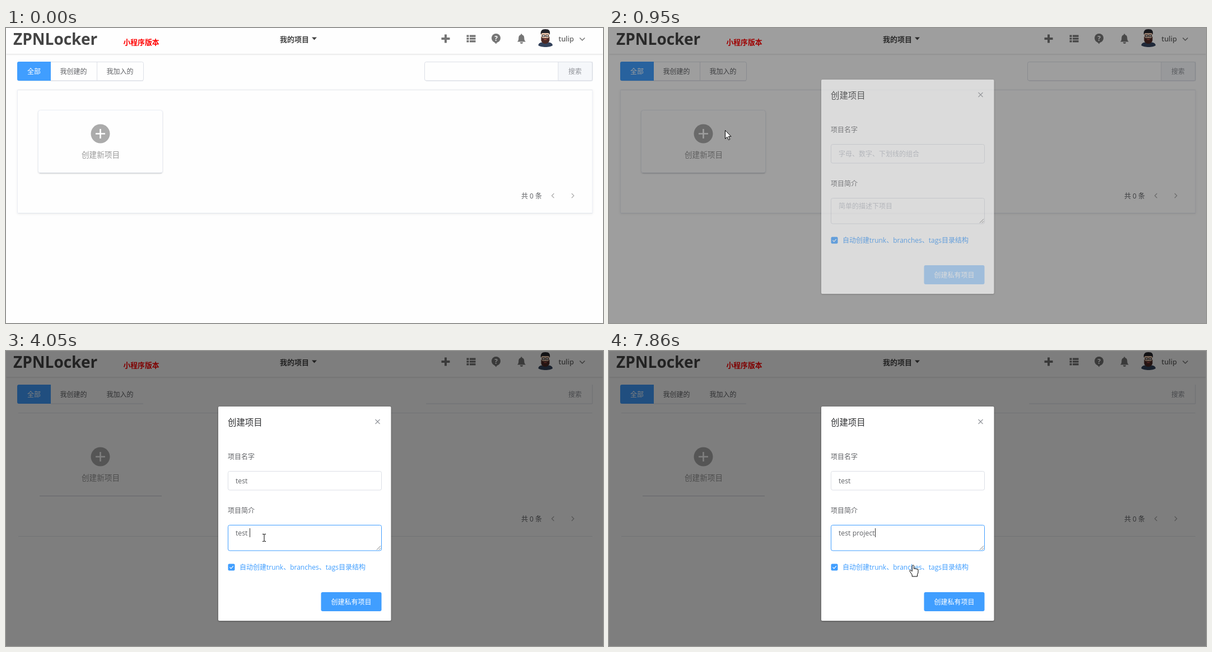
Write an HTML page that moves like this. It is 1066 px wide and 526 px high and loops after 8 s.

```html
<!DOCTYPE html>
<html lang="zh">
<head>
<meta charset="utf-8">
<title>创建项目</title>
<style>
  html, body { margin: 0; width: 100%; height: 100%; overflow: hidden; background: #fefefe; }
  svg { display: block; }
  text { font: 12px "Open Sans", "Noto Sans CJK SC", "Noto Sans CJK", sans-serif; fill: #606266; dominant-baseline: central; white-space: pre; }
  .mid { text-anchor: middle; }
  .line { fill: none; stroke: #dcdfe6; }
  .icon { fill: #757575; }
  .chevron { fill: none; stroke: #aaa; stroke-width: 1.2; }
  .hint { fill: #c0c4cc; }
  .field { fill: #fff; stroke: #dcdfe6; }
  .typed { font-size: 12.3px; }
  #header { filter: drop-shadow(0 1px 1.5px #0002); }
  #panel { filter: drop-shadow(0 1px 2px #0001); }
  #dialogBox { filter: drop-shadow(0 1px 1.5px #0005); }
  #pointer > * { fill: #fff; stroke: #000; stroke-linejoin: round; }
</style>
</head>
<body>
<svg width="1066" height="526" viewBox="0 0 1066 526">
  <rect id="header" width="1066" height="46" fill="#fefefe"/>
  <text x="13" y="19.3" style="font-size:28px;font-weight:700;fill:#444">ZPNLocker</text>
  <text x="209.5" y="24.5" style="font-size:12.8px;font-weight:700;fill:#f00">小程序版本</text>
  <text x="489" y="19.5" style="font-size:13px;font-weight:700;fill:#444">我的项目</text>
  <path d="M546 16.5h9l-4.500 5z" fill="#444"/>
  <g class="icon">
    <path d="M783 11.500h4v5.500h5.500v4H787v5.500h-4V21h-5.500v-4h5.500z"/>
    <path d="M822.500 12.500h4v3.500h-4zm5.500 0h10.500v3.500H828zM822.500 17.300h4v3.500h-4zm5.500 0h10.500v3.500H828zM822.500 22h4v3.500h-4zm5.500 0h10.500v3.500H828z"/>
    <circle cx="875" cy="18" r="8"/>
    <path d="M871 24h7l-3 4.500z"/>
    <path d="M913 24.500c2-2 2.300-4 2.300-7 0-3 1.700-5 4-5.500v-1.500h2V12c2.500.5 4 2.500 4 5.500 0 3 .5 5 2.700 7zM918 25.500h5a2.500 2.500 0 0 1-5 0z"/>
  </g>
  <text class="mid" x="875" y="18" style="font-weight:700;fill:#fff">?</text>
  <g id="avatar">
    <path d="M950.500 31c0-4 4-6 12.500-6s13 2 13 6c-4 4-21 4-25.500 0z" fill="#33425b"/>
    <path d="M956 9h14v11c0 9-14 9-14 0z" fill="#e8c3aa"/>
    <path d="M955 12c-1-7 2-10 8-10 7 0 9 3 8 10l-2-3h-12z" fill="#25252b"/>
    <path d="M955.500 15l2.500 3h10l2.500-3v7c-2 8-13 8-15 0z" fill="#4b2924"/>
    <path d="M957.500 12.500h4.500v3h-4.500zm6.500 0h4.500v3H964z" fill="#f4e8e0" stroke="#25252b"/>
    <path d="M960.500 20.500h5" stroke="#b8544c" stroke-width="1.500"/>
  </g>
  <text x="986.500" y="19" style="font-size:12.5px;font-weight:600;fill:#666">tulip</text>
  <path d="M1024.500 17.500l4.500 4.500 4.500-4.500" fill="none" stroke="#757575" stroke-width="1.500"/>

  <g id="soft">
    <rect class="line" x="20.500" y="60.500" width="225" height="33.500" rx="3"/>
    <path class="line" d="M162.500 60v34"/>
    <rect class="line" x="747.500" y="60.500" width="299.500" height="33.500" rx="3"/>
    <path class="line" d="M986 60.500h58q3 0 3 3v27.500q0 3-3 3h-58z" style="fill:#f5f7fa"/>
    <rect id="panel" x="20.500" y="110.500" width="1026.500" height="219.500" fill="#fefefe" stroke="#ebeef5"/>
  </g>
  <path class="line" d="M80 94H245M750 94H1047V60"/>
  <path d="M22 110.500H1047M22 330.500H1047" stroke="#e4e7ec"/>
  <path d="M80 60v34H23q-3 0-3-3V63q0-3 3-3z" fill="#409eff"/>
  <text class="mid" x="50" y="77" style="fill:#fff">全部</text>
  <text class="mid" x="120.500" y="77">我创建的</text>
  <text class="mid" x="203.500" y="77">我加入的</text>
  <text class="mid" x="1016" y="77" style="fill:#909399">搜索</text>

  <g id="card">
    <rect id="cardBox" x="57.500" y="146.500" width="222" height="112" rx="4" fill="#fefefe" stroke="#ebeef5"/>
    <path d="M60 258.500H278" stroke="#c9ced6"/>
    <circle id="plus" cx="168.500" cy="188.500" r="17"/>
    <path d="M160 188.500h17m-8.500-8.500v17" stroke="#fff" stroke-width="2.600"/>
    <text class="mid" x="169" y="225" style="font-size:13.6px;fill:#999">创建新项目</text>
  </g>
  <text x="920" y="299">共 0 条</text>
  <path class="chevron" d="M978.500 295l-4 4 4 4M1010 295l4 4-4 4"/>

  <rect id="shade" width="1066" height="526"/>
  <g id="dialog">
    <rect id="dialogBox" x="379" y="99" width="308.500" height="382" rx="2" fill="#fff"/>
    <text x="396" y="127" style="font-size:15.4px;fill:#303133">创建项目</text>
    <path d="M659.500 122l8 8m0-8l-8 8" stroke="#909399" stroke-width="1.100"/>
    <text x="396" y="188.500">项目名字</text>
    <rect id="nameBox" class="field" x="396.500" y="214.500" width="274" height="33.500" rx="3"/>
    <text id="nameHint" class="hint" x="410" y="231.500">字母、数字、下划线的组合</text>
    <text id="name" class="typed" x="410" y="231"></text>
    <text x="396" y="284.500">项目简介</text>
    <rect id="infoBox" class="field" x="396.500" y="310.500" width="274" height="45.500" rx="3"/>
    <text id="infoHint" class="hint" x="410" y="324.500">简单的描述下项目</text>
    <text id="info" class="typed" x="410" y="324"></text>
    <path d="M662 354.500l7-7m-3 7l3-3" stroke="#777"/>
    <rect x="396.500" y="379.500" width="12" height="12" rx="2" fill="#409eff"/>
    <path d="M399.500 385.500l2.300 2.300 4-4.500" fill="none" stroke="#fff" stroke-width="1.200"/>
    <text x="417" y="385" style="fill:#409eff">自动创建trunk、branches、tags目录结构</text>
    <rect id="submit" x="562.500" y="430" width="108" height="34" rx="3"/>
    <text class="mid" x="616.500" y="447" style="fill:#fff">创建私有项目</text>
    <rect id="caret" width="1" height="16" fill="#333"/>
  </g>

  <g id="pointer">
    <path id="arrow" d="M.5.500v15l3.500-3.300 2.500 5.300 2.300-1-2.400-5.200h4.600z"/>
    <path id="beam" d="M-3-6.500h2.200l.8.800.8-.8H3M0-6V6M-3 6.500h2.200l.8-.8.8.8H3" style="fill:none"/>
    <path id="hand" d="M0 0c-1.500 0-1.800 1-1.800 2v9l-2-2c-1.500-1-3 .4-2 1.800l4 6.200v3h9.300v-3l1.500-4V8c0-1.500-2-1.700-2.300-.5 0-1.700-2.500-2-2.700-.6 0-1.500-2.300-1.600-2.400-.4V2c0-1-.2-2-1.600-2z"/>
  </g>
</svg>
<script>
const LOOP = 8000, BLINK = 505;
const el = id => document.getElementById(id);
const set = (id, attrs) => { for (const key in attrs) el(id).setAttribute(key, attrs[key]); };
const show = (id, on) => set(id, { visibility: on ? 'visible' : 'hidden' });

const ticks = [0, 1720, 2190, 2340, 3730, 3900, 4050, 4510, 4590, 4740, 5140, 5210, 5440, 5610, 6620];
const bursts = [[70, 640, 8], [870, 1020, 3], [1100, 1640, 8], [1870, 2020, 3], [2570, 3200, 9],
  [3430, 3580, 3], [6140, 6450, 5], [7000, 7380, 6], [7550, 7860, 5]];
for (const [first, last, count] of bursts)
  for (let i = 0; i < count; i++) ticks.push(Math.floor(first + (last - first) * i / (count - 1)));
ticks.sort((a, b) => a - b);

// Pointer hot spots: [time, x, y]
const path = [[70, 939, 505], [230, 600, 360], [400, 330, 238], [640, 185, 176], [870, 185, 176],
  [1020, 229, 188], [1330, 400, 218], [1640, 481, 231], [2340, 481, 231], [2800, 468, 285],
  [3200, 461, 333], [5610, 461, 333], [6140, 475, 359], [6450, 493, 391], [6620, 493, 391],
  [7000, 515, 400], [7240, 632, 464], [7380, 628, 449], [7550, 612, 436], [7860, 543, 382]];

const nameKeys = [[1870, 't'], [2020, 'e'], [2190, 's'], [2340, 't']];
const infoKeys = [[3430, 't'], [3580, 'e'], [3730, 's'], [3900, 't'], [4050, ' '], [4510, 'p'],
  [4740, 'ro'], [5140, 'j'], [5210, 'e'], [5440, 'c'], [5610, 't']];
const NAME_FOCUS = 1720, INFO_FOCUS = 3040;

const easeOut = (t, start, length) =>
  1 - (1 - Math.min(1, Math.max(0, (t - start) / length))) ** 2.2;
const inside = ([x, y], left, top, right, bottom) => x >= left && x <= right && y >= top && y <= bottom;

function pointerAt(t) {
  const next = path.findIndex(p => p[0] > t);
  if (next < 0) return path.at(-1).slice(1);
  if (next === 0) return path[0].slice(1);
  const [t0, x0, y0] = path[next - 1], [t1, x1, y1] = path[next];
  const k = (t - t0) / (t1 - t0);
  return [x0 + (x1 - x0) * k, y0 + (y1 - y0) * k];
}

function typeInto(id, keys, t) {
  const value = keys.filter(k => k[0] <= t).map(k => k[1]).join('');
  el(id).textContent = value;
  show(id + 'Hint', !value);
}

function drawCaret(t) {
  const onInfo = t >= INFO_FOCUS;
  const stamps = [onInfo ? INFO_FOCUS : NAME_FOCUS, ...(onInfo ? infoKeys : nameKeys).map(k => k[0])];
  const last = Math.max(...stamps.filter(s => s <= t));
  show('caret', t >= NAME_FOCUS && Math.floor((t - last) / BLINK) % 2 === 0);
  const width = el(onInfo ? 'info' : 'name').getComputedTextLength();
  set('caret', { x: Math.round(410 + width), y: onInfo ? 316 : 223 });
}

function drawPointer(t, spot) {
  const open = t >= 1020;
  const beam = open && (inside(spot, 396, 214, 670, 248) || inside(spot, 396, 310, 670, 356));
  const hand = open && (inside(spot, 396, 378, 644, 394) || inside(spot, 562, 430, 670, 464));
  show('arrow', t >= 70 && !beam && !hand);
  show('beam', beam);
  show('hand', hand);
  set('pointer', { transform: `translate(${spot.map(Math.round)})` });
}

function draw(now) {
  const time = now % LOOP;
  const t = ticks.findLast(tick => tick <= time);
  const spot = pointerAt(t);

  const hover = t >= 70 && t < 940 && inside(spot, 57, 146, 280, 258);
  set('card', { transform: `translate(0 ${hover ? -2 : 0})` });
  el('cardBox').style.filter = hover ? 'drop-shadow(0 2px 4px #0005)' : t < 1000 ? 'drop-shadow(0 1px 1px #0002)' : 'none';
  set('cardBox', { stroke: t < 1000 ? '#ebeef5' : 'none' });
  set('plus', { fill: hover ? '#4a9ad9' : '#ababab' });
  show('soft', t < 1000);

  const opening = easeOut(t, 835, 300);
  set('shade', { opacity: t < 870 ? 0 : easeOut(t, 849, 200) / 2 });
  set('dialog', { opacity: t < 870 ? 0 : opening, transform: `translate(0 ${Math.round(-20 * (1 - opening))})` });

  set('nameBox', { style: t >= NAME_FOCUS && t < INFO_FOCUS ? 'stroke:#409eff' : '' });
  set('infoBox', { style: t >= INFO_FOCUS ? 'stroke:#409eff' : '' });
  typeInto('name', nameKeys, t);
  typeInto('info', infoKeys, t);
  drawCaret(t);

  const overSubmit = t > 7000 && inside(spot, 562, 430, 670, 464);
  set('submit', { fill: t < 1940 ? '#a0cfff' : overSubmit ? '#66b1ff' : '#409eff' });
  drawPointer(t, spot);
  requestAnimationFrame(draw);
}
requestAnimationFrame(draw);
</script>
</body>
</html>
```
